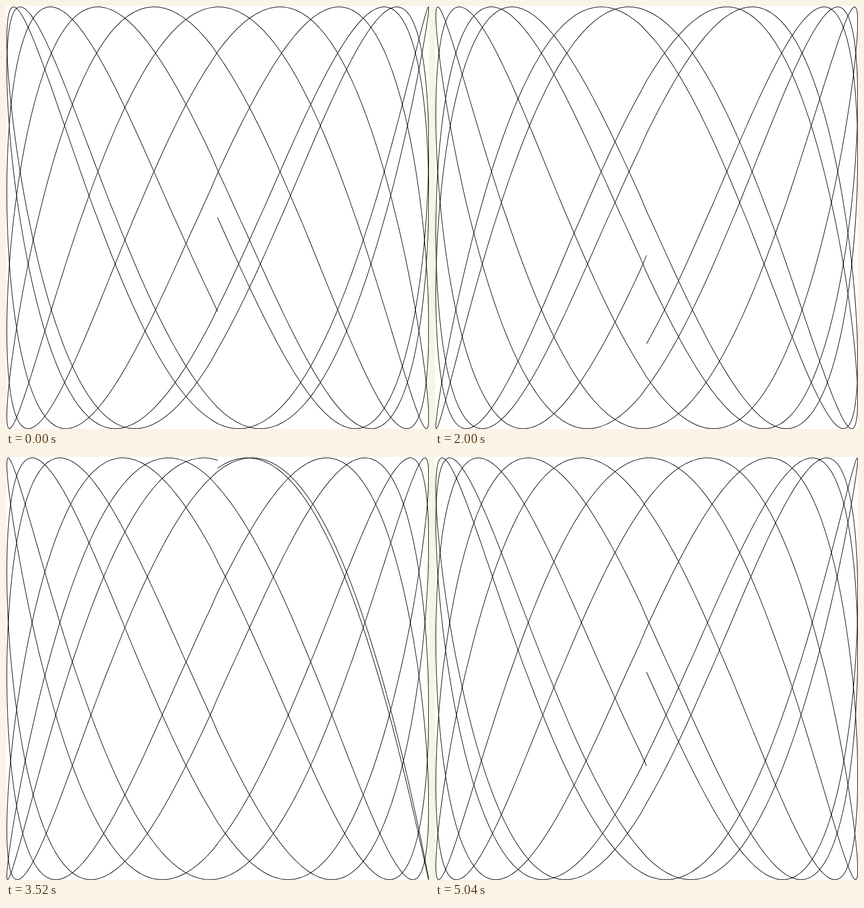
An HTML page without scripts for the animation above (5.12 s loop, 748 px wide and 748 px high).

```html
<!DOCTYPE html>
<html lang="en">
<head>
<meta charset="utf-8">
<title>Lissajous curve</title>
<style>
  @property --phase { syntax: "<number>"; inherits: true; initial-value: 0; }
  @property --t { syntax: "<number>"; inherits: false; initial-value: 0; }
  @property --u0 { syntax: "<number>"; inherits: false; initial-value: 0; }
  @property --v0 { syntax: "<number>"; inherits: false; initial-value: 0; }
  @property --u1 { syntax: "<number>"; inherits: false; initial-value: 0; }
  @property --v1 { syntax: "<number>"; inherits: false; initial-value: 0; }
  @property --x { syntax: "<number>"; inherits: false; initial-value: 0; }
  @property --y { syntax: "<number>"; inherits: false; initial-value: 0; }
  @property --dx { syntax: "<number>"; inherits: false; initial-value: 0; }
  @property --dy { syntax: "<number>"; inherits: false; initial-value: 0; }
  @property --len { syntax: "<number>"; inherits: false; initial-value: 1; }

  html, body { margin: 0; width: 100%; height: 100%; overflow: hidden; background: #fff; }

  svg {
    display: block;
    width: 748px;
    height: 748px;
    overflow: hidden;
    --freq: 2.214674;
    --radius: 374;
    --step: calc(pi / 100);
    animation: drift 5.12s steps(64) infinite;
  }
  @keyframes drift {
    from { --phase: 0; }
    to { --phase: 6.4; }
  }

  /* One short chord of x = sin(t), y = sin(freq * t + phase); 1000 chords make 5 turns. */
  rect {
    --t: calc((var(--k) * 100 + var(--j) * 10 + var(--i)) * var(--step));
    --u0: calc(var(--radius) * sin(var(--t)));
    --v0: calc(var(--radius) * sin(var(--t) * var(--freq) + var(--phase)));
    --u1: calc(var(--radius) * sin(var(--t) + var(--step)));
    --v1: calc(var(--radius) * sin((var(--t) + var(--step)) * var(--freq) + var(--phase)));
    /* Rounding toward zero moves the negative half one pixel inward. */
    --x: calc(374.5 + var(--u0) - clamp(-1, var(--u0), 0));
    --y: calc(374.5 + var(--v0) - clamp(-1, var(--v0), 0));
    --dx: calc(374.5 + var(--u1) - clamp(-1, var(--u1), 0) - var(--x));
    --dy: calc(374.5 + var(--v1) - clamp(-1, var(--v1), 0) - var(--y));
    --len: hypot(var(--dx), var(--dy));
    x: 0;
    y: -.5px;
    width: 1.02px; /* slight overlap hides the joints */
    height: 1px;
    fill: #000;
    transform-origin: 0 0;
    transform: matrix(
      var(--dx), var(--dy),
      calc(var(--dy) / var(--len) * -1), calc(var(--dx) / var(--len)),
      var(--x), var(--y));
  }
</style>
</head>
<body>
<svg viewBox="0 0 749 749">
  <defs>
    <g id="ten">
      <rect style="--i:0"/>
      <rect style="--i:1"/>
      <rect style="--i:2"/>
      <rect style="--i:3"/>
      <rect style="--i:4"/>
      <rect style="--i:5"/>
      <rect style="--i:6"/>
      <rect style="--i:7"/>
      <rect style="--i:8"/>
      <rect style="--i:9"/>
    </g>
    <g id="hundred">
      <use href="#ten" style="--j:0"/>
      <use href="#ten" style="--j:1"/>
      <use href="#ten" style="--j:2"/>
      <use href="#ten" style="--j:3"/>
      <use href="#ten" style="--j:4"/>
      <use href="#ten" style="--j:5"/>
      <use href="#ten" style="--j:6"/>
      <use href="#ten" style="--j:7"/>
      <use href="#ten" style="--j:8"/>
      <use href="#ten" style="--j:9"/>
    </g>
  </defs>
  <use href="#hundred" style="--k:0"/>
  <use href="#hundred" style="--k:1"/>
  <use href="#hundred" style="--k:2"/>
  <use href="#hundred" style="--k:3"/>
  <use href="#hundred" style="--k:4"/>
  <use href="#hundred" style="--k:5"/>
  <use href="#hundred" style="--k:6"/>
  <use href="#hundred" style="--k:7"/>
  <use href="#hundred" style="--k:8"/>
  <use href="#hundred" style="--k:9"/>
</svg>
</body>
</html>
```
